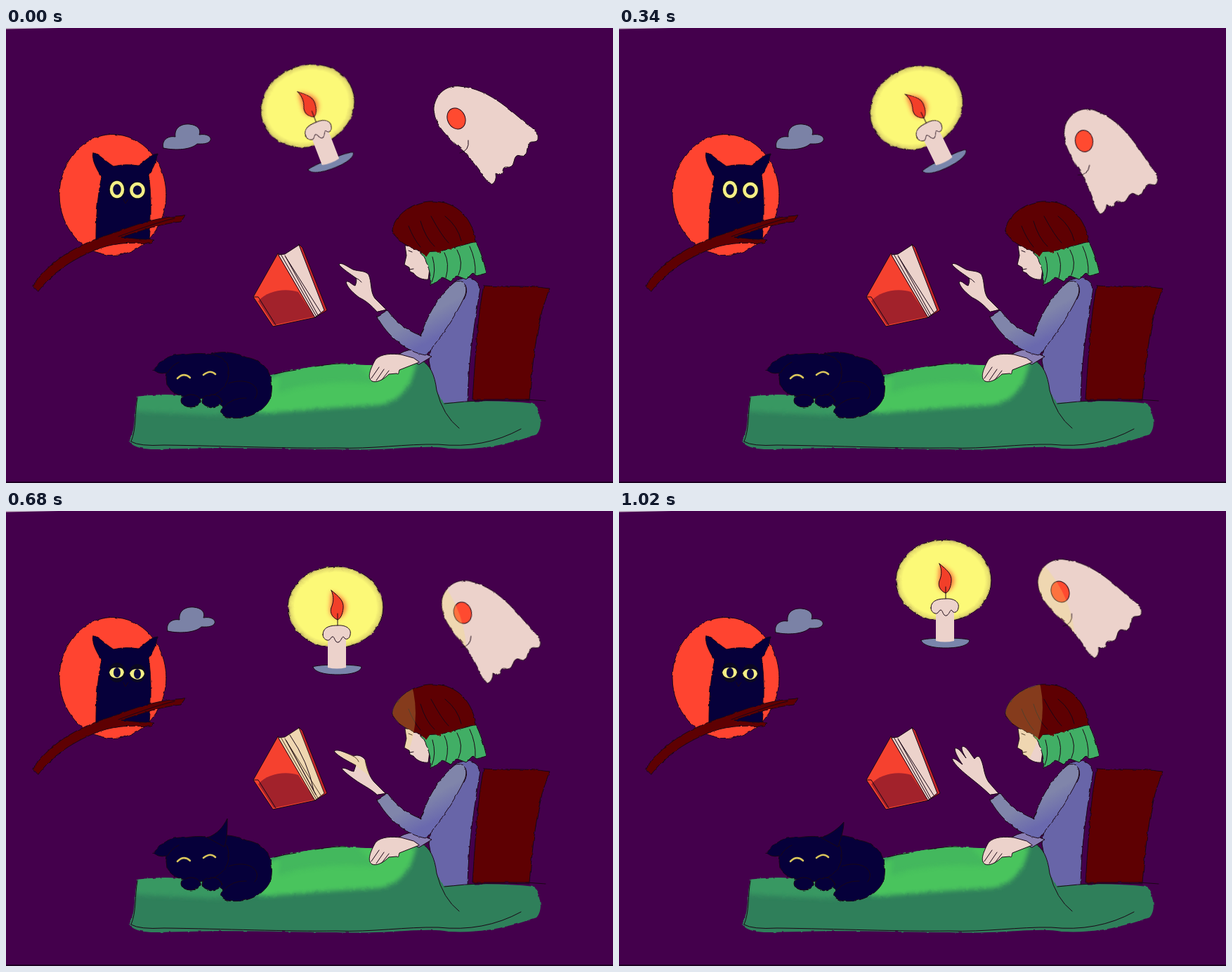
An HTML page without scripts for the animation above (1.19 s loop, 864 by 648 pixels).

```html
<!DOCTYPE html>
<html lang="en">
<head>
<meta charset="utf-8">
<title>Bedtime reading</title>
<style>
  html, body { margin: 0; width: 100%; height: 100%; overflow: hidden; background: #44004c; }
  svg { display: block; width: 100%; height: 100%; }

  .ink { stroke: #1a0716; stroke-width: 1; stroke-linejoin: round; stroke-linecap: round; }
  .line { fill: none; }
  .skin { fill: #ecd2cb; }
  .fur { fill: #06003a; }
  .wood { fill: #5e0002; }
  .light { fill: #f8e468; opacity: .26; }

  [class*="move-"], [class*="show-"] { animation: 1190ms step-end infinite; }
  .move-candle { animation-name: candle; }
  .move-ghost { animation-name: ghost; }
  .move-ghost-light { animation-name: ghost-light; }
  .move-hair-light { animation-name: hair-light; }
  .move-cloud { animation-name: cloud; }
  .show-rest { animation-name: rest; }
  .show-turn { animation-name: turn; }
  .show-point { animation-name: point; }
  .show-raise { animation-name: raise; }
  .show-wide { animation-name: wide; }
  .show-half { animation-name: half; }
  .show-lit { animation-name: lit; }

  @keyframes candle {
    0% { transform: translate(464px, 193px) rotate(-21deg); }
    14.28% { transform: translate(461px, 198px) rotate(-13deg); }
    28.57% { transform: translate(465px, 192px) rotate(-26deg); }
    42.85% { transform: translate(466px, 214px) rotate(-34deg); }
    57.14% { transform: translate(472px, 226px); }
    71.42% { transform: translate(481px, 196px) rotate(20deg); }
    85.71% { transform: translate(465px, 188px); }
  }
  @keyframes ghost {
    0%, 71.42% { transform: translate(641px, 129px); }
    14.28% { transform: translate(649px, 139px) rotate(13deg); }
    28.57% { transform: translate(662px, 161px) rotate(16deg); }
    42.85% { transform: translate(667px, 168px) rotate(20deg); }
    57.14% { transform: translate(650px, 145px) rotate(9deg); }
    85.71% { transform: translate(628px, 115px) rotate(1deg); }
  }
  @keyframes ghost-light {
    0% { transform: translateX(-400px); }
    42.85% { transform: translate(-68px, 20px); }
    57.14% { transform: translate(-54px, 75px); }
    71.42% { transform: none; }
    85.71% { transform: translate(-48px, 70px); }
  }
  @keyframes hair-light {
    0% { transform: translateX(-300px); }
    42.85% { transform: translateX(-41px); }
    57.14% { transform: translateX(-31px); }
    71.42% { transform: none; }
    85.71% { transform: translate(-11px, -8px); }
  }
  @keyframes cloud {
    0% { transform: none; }
    57.14% { transform: translateX(6px); }
    71.42% { transform: translate(8px, -1px); }
    85.71% { transform: translate(-1px, 2px); }
  }
  @keyframes rest { 0% { opacity: 1; } 42.85% { opacity: 0; } }
  @keyframes turn { 0%, 57.14% { opacity: 0; } 42.85% { opacity: 1; } }
  @keyframes point { 0%, 85.71% { opacity: 0; } 57.14% { opacity: 1; } }
  @keyframes raise { 0% { opacity: 0; } 85.71% { opacity: 1; } }
  @keyframes wide { 0% { opacity: 1; } 57.14% { opacity: 0; } }
  @keyframes half { 0%, 71.42% { opacity: 0; } 57.14%, 85.71% { opacity: 1; } }
  @keyframes lit { 0%, 85.71% { opacity: 0; } 42.85% { opacity: 1; } }
</style>
</head>
<body>
<svg viewBox="0 0 864 648" preserveAspectRatio="none">
  <defs>
    <!-- slightly uneven painted edges -->
    <filter id="paint" x="-10%" y="-10%" width="120%" height="120%" color-interpolation-filters="sRGB">
      <feTurbulence type="fractalNoise" baseFrequency=".11" numOctaves="2" seed="4"/>
      <feDisplacementMap in="SourceGraphic" scale="3" xChannelSelector="R" yChannelSelector="G"/>
    </filter>
    <filter id="soft" x="-30%" y="-30%" width="160%" height="160%"><feGaussianBlur stdDeviation="3"/></filter>
    <radialGradient id="glow">
      <stop offset=".86" stop-color="#fcf977"/>
      <stop offset=".96" stop-color="#e3da6c"/>
      <stop offset="1" stop-color="#a8965f"/>
    </radialGradient>
    <linearGradient id="sleeve" x1=".35" y1=".2" x2=".7" y2=".75">
      <stop offset=".5" stop-color="#8085aa"/>
      <stop offset="1" stop-color="#6a69ae"/>
    </linearGradient>
    <path id="ghost-body" d="M-32-17C-28-38-12-48 5-46C50-42 80-8 115 20Q119 33 111 33Q101 32 101 43Q99 56 91 53Q84 50 82 61Q80 71 72 69Q66 68 66 76Q64 82 56 78Q58 90 50 94C40 88 30 68 12 48C-8 30-34 10-32-17Z"/>
    <path id="hair" d="M550 289C550 270 575 249 602 247C636 245 662 264 669 304L640 312L612 318L591 319C578 313 558 307 550 289Z"/>
    <path id="face" d="M568 310L570 324L567 337L574 341L575 347L580 349C585 356 594 359 601 358L606 320L585 312Z"/>
    <path id="pages" d="M388 323L397 322L417 309L453 402L440 412Z"/>
    <clipPath id="ghost-clip"><use href="#ghost-body"/></clipPath>
    <clipPath id="head-clip"><use href="#hair"/><use href="#face"/></clipPath>
    <clipPath id="blanket-clip"><use href="#blanket"/></clipPath>
  </defs>

  <rect width="864" height="648" fill="#44004c"/>
  <path d="M0 0H75L0 1.5Z" fill="#c9bcc9"/>
  <path d="M0 647H864" stroke="#1d0022" stroke-width="2"/>

  <g id="owl">
    <g filter="url(#paint)">
      <ellipse class="ink" cx="152" cy="237.5" rx="76" ry="86" fill="#ff4430"/>
      <path class="fur ink" d="M124 178C130 177 139 188 153 197Q170 193 188 196C198 190 206 180 215 179C215 190 208 202 203 209C207 235 207 270 204 301H128C128 270 130 240 136 212C128 200 121 185 124 178Z"/>
      <path class="wood ink" d="M38 367C60 335 95 310 150 293C185 280 215 269 255 267L249 276C225 278 200 286 164 298Q188 301 211 302L206 307C175 305 150 306 125 317C90 332 65 350 46 375Z"/>
    </g>
    <path class="ink line" d="M167 244L170 250L174 244M160 297C190 286 215 277 240 271"/>
    <g fill="#0b0822"><ellipse cx="158" cy="230" rx="12" ry="14"/><ellipse cx="187" cy="231" rx="12" ry="13"/></g>
    <g class="show-wide" fill="#0a0740" stroke="#f4ef86" stroke-width="4.5">
      <ellipse cx="158" cy="230" rx="8" ry="10"/><ellipse cx="187" cy="231" rx="8.5" ry="9"/>
    </g>
    <g class="show-half">
      <path fill="#f4ef86" d="M147 230Q149 222 158 223Q167 222 168 230Q166 238 157 238Q149 238 147 230ZM176 231Q179 224 187 225Q196 224 197 232Q195 239 187 240Q178 239 176 231Z"/>
      <g fill="#0a0740"><ellipse cx="158" cy="230" rx="5" ry="7"/><ellipse cx="187" cy="232" rx="5" ry="7"/></g>
    </g>
  </g>

  <path class="move-cloud ink" fill="#7b82a6" d="M224 171C221 160 230 153 241 155C239 141 251 136 261 137C273 138 278 145 275 152C286 150 293 155 291 160C288 166 277 165 272 165C264 173 242 175 224 171Z"/>

  <g class="move-ghost">
    <use href="#ghost-body" class="skin ink" filter="url(#paint)"/>
    <ellipse class="ink" rx="12.5" ry="15.5" transform="rotate(-25)" fill="#ff4a30"/>
    <path class="ink line" d="M17 31Q19 46 5 49"/>
    <g clip-path="url(#ghost-clip)"><circle class="light move-ghost-light" cx="-100" cy="10" r="171"/></g>
  </g>

  <g class="move-candle">
    <ellipse class="ink" cx="-3" cy="-89" rx="68" ry="58" fill="url(#glow)" stroke-dasharray="38 9 14 6" filter="url(#paint)"/>
    <path d="M-9-111C7-105 14-96 12-86C8-70-8-70-11-84Z" fill="#ff4a2a" opacity=".75" filter="url(#soft)"/>
    <path class="ink" fill="#f23f29" d="M-9-113C2-104 9-98 8-88C7-78 4-73 0-71C-9-75-12-83-8-91C-5-99-6-106-9-113Z"/>
    <path class="ink line" d="M0-80L0-62"/>
    <path class="ink" fill="#7985ab" d="M-35-4C-30-8 30-8 34-4C33 3 20 7 0 7C-20 7-33 3-35-4Z"/>
    <path class="skin" d="M-14-48V-3Q-1 0 12-3V-48Z"/>
    <path class="skin ink" d="M-21-50C-21-62-8-63 0-63C12-64 20-58 18-50C17-43 11-42 9-46C7-50 5-40 1-39C-4-38-4-47-7-47C-10-47-10-41-15-42Q-21-44-21-50Z"/>
  </g>

  <g id="book">
    <path class="ink" fill="#f5412f" d="M387 321L352 383L380 425L441 412Z"/>
    <path fill="#a2222b" d="M359 389C372 374 397 370 416 376L439 411L381 423Z"/>
    <path class="ink line" d="M353 383L359 383L384 423"/>
    <path class="ink" fill="#c8262a" d="M417 308L422 313L457 402L440 412Z"/>
    <use href="#pages" class="skin ink"/>
    <path class="ink line" d="M391 322L442 411M397 324L444 409M398 326L448 405"/>
    <g class="show-lit">
      <use href="#pages" class="light"/>
      <path class="ink line" d="M404 319Q430 357 438 398M399 327L441 404"/>
    </g>
    <path class="show-turn" fill="#e8a03c59" d="M387 323L355 381L386 348L403 368L411 362Z"/>
  </g>

  <g id="bed">
    <path class="wood ink" filter="url(#paint)" d="M680 367C705 369 740 366 774 371C757 410 750 470 745 529H664C668 470 671 410 680 367Z"/>
    <path class="ink line" d="M740 529L768 531"/>
    <path class="ink" fill="#6865a8" filter="url(#paint)" d="M637 362C655 351 672 356 675 371C667 420 658 470 657 537H614L602 474L612 410Z"/>
    <g filter="url(#paint)">
      <path id="blanket" fill="#2f7f5a" d="M187 525Q225 520 255 524L378 494C410 486 450 479 482 478Q540 484 592 474Q608 482 613 516L622 534Q690 528 752 535C761 548 765 568 755 579C720 591 680 602 630 599C600 592 540 603 470 600C400 600 330 596 220 600Q180 601 176 588C185 570 182 545 187 525Z"/>
      <g clip-path="url(#blanket-clip)">
        <path fill="#389862" filter="url(#soft)" d="M184 520L380 480V546L300 552L184 546Z"/>
        <path fill="#49c45d" filter="url(#soft)" d="M374 500Q420 470 482 474L584 476C580 500 570 528 534 537C470 540 410 546 360 549Z"/>
        <path fill="#3aa35f" filter="url(#soft)" d="M388 488Q440 468 500 476L525 506Q440 500 388 520Z" opacity=".35"/>
      </g>
    </g>
    <path class="ink line" d="M187 527C183 547 186 570 178 589Q190 596 225 594C310 595 400 599 470 598C520 600 570 592 615 593Q680 600 733 571M382 493Q396 489 413 487M440 482Q470 477 484 478M592 474Q609 482 613 516Q622 552 645 570M624 535Q680 528 745 531"/>
  </g>

  <g id="cat">
    <g class="ink fur" filter="url(#paint)">
      <path d="M286 466C310 457 330 464 342 469C374 474 382 500 377 525C370 545 345 559 316 555C304 552 303 545 310 540L290 525Z"/>
      <path d="M209 487C225 468 240 464 256 465C275 462 305 462 315 478C322 500 311 520 283 527C258 530 235 522 229 508Q227 498 229 491Q218 494 209 487Z"/>
      <ellipse cx="263" cy="531" rx="14" ry="9"/>
      <ellipse cx="293" cy="531" rx="14" ry="9"/>
    </g>
    <path class="ink line" d="M317 506C345 496 366 512 354 528M310 540Q322 526 342 527M230 491Q236 480 246 476"/>
    <g class="fur ink">
      <path class="show-turn" d="M284 465L296 459L337 458L319 475Z"/>
      <path class="show-point" d="M287 465C301 460 309 450 315 438C315 455 315 465 311 478Z"/>
      <path class="show-raise" d="M288 465C302 460 312 452 320 443C320 455 315 468 312 478Z"/>
    </g>
    <path fill="none" stroke="#d9c45c" stroke-width="2.6" stroke-linecap="round" d="M244 499Q253 490 262 498M281 494Q291 486 298 493"/>
  </g>

  <g id="reader">
    <path class="ink" fill="#8a80b4" d="M560 464Q574 456 584 459L606 468L588 479Z"/>
    <path class="skin ink" d="M588 476L560 487C558 492 560 494 556 492L545 493C538 500 528 506 521 503C515 499 516 490 526 472C535 463 550 464 562 465L580 470Z"/>
    <path class="ink line" d="M520 499L531 483M527 502L538 486M535 501L545 488"/>

    <g class="skin ink">
      <g class="show-rest">
        <path d="M528 404C520 395 512 388 503 384C495 378 486 370 484 362C487 358 492 366 497 367Q500 360 498 356C490 350 480 344 474 337C476 332 486 340 494 344C503 347 510 345 516 351C521 362 518 375 525 385L541 401Z"/>
        <path class="line" d="M498 356Q503 358 506 362"/>
      </g>
      <g class="show-turn">
        <path d="M528 404C520 396 508 390 500 385L479 375C480 371 490 374 497 372C494 366 470 356 466 349C468 342 476 346 480 345C488 344 500 348 508 354C518 362 520 376 526 386L540 402Z"/>
        <path class="line" d="M470 346Q486 354 495 360M478 345Q491 351 499 357"/>
      </g>
      <g class="show-point">
        <path d="M528 404C520 396 505 389 497 383C490 378 482 372 478 367C482 364 488 370 495 371L498 362C488 357 472 349 467 342C472 338 485 345 494 349C502 346 508 350 511 354C513 366 517 378 524 386L540 402Z"/>
        <path class="line" d="M494 349Q500 352 502 357"/>
        <path class="light" stroke="none" d="M467 342Q485 344 496 349L511 354L518 378L497 362Z"/>
      </g>
      <path class="show-raise" d="M528 404C520 396 510 388 500 380C490 372 478 362 474 353C478 351 484 358 489 361C485 355 478 345 478 338C483 336 489 346 494 352C490 345 486 338 489 335C495 335 501 347 506 353Q509 348 513 350C520 360 518 374 526 386L540 402Z"/>
    </g>

    <path class="ink" fill="url(#sleeve)" filter="url(#paint)" d="M528 411L543 402C556 420 572 431 590 438C600 410 615 380 640 361C655 358 658 372 652 384C640 410 618 442 598 466C570 462 542 438 528 411Z"/>
    <path class="ink line" d="M590 438L594 430M654 366Q658 376 652 386"/>

    <use href="#face" class="skin ink"/>
    <path class="ink line" d="M574 344L580 343M573 317L578 319"/>
    <g filter="url(#paint)">
      <path class="ink" fill="#41ae65" d="M591 319L612 314L640 309L668 303Q678 322 684 349L670 353L664 349L655 358L642 353L633 361L622 355L613 361L604 367C606 350 600 335 591 319Z"/>
      <use href="#hair" class="wood ink"/>
      <path class="wood" d="M591 317L598 326L606 315L617 321L624 311L633 316L640 307L652 309L657 303L668 306L655 285Z"/>
    </g>
    <path class="ink line" d="M573 282Q580 300 590 312M590 275Q597 299 610 311M605 268Q620 296 630 306M625 268Q643 282 648 303M607 326Q613 346 606 362M624 320Q632 335 626 356M642 316Q652 334 644 352M660 311Q669 330 668 350"/>
    <path class="show-turn" fill="#44004c" d="M614 250C648 254 662 276 667 303L663 304C654 282 638 262 614 250Z"/>
    <g clip-path="url(#head-clip)"><circle class="light move-hair-light" cx="464" cy="288" r="150"/></g>
  </g>
</svg>
</body>
</html>
```
